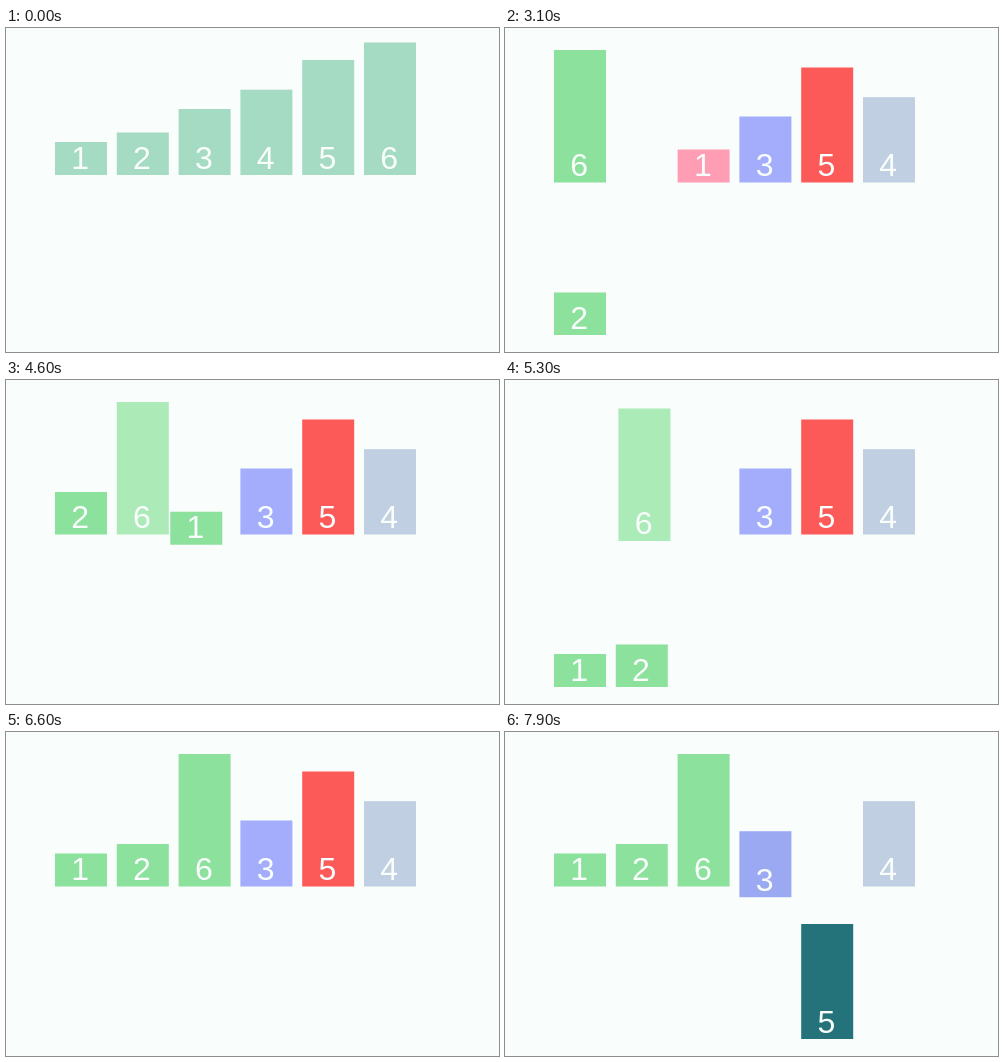
These frames come from a looping animation (493x324 px, 8 s). An HTML page with a canvas:

```html
<!DOCTYPE html>
<html lang="en">
<head>
<meta charset="utf-8">
<title>Merge sort</title>
<style>
  html, body { margin: 0; width: 100%; height: 100%; overflow: hidden; background: #f9fdfc; }
  canvas { display: block; width: 493px; height: 324px; }
</style>
</head>
<body>
<canvas id="stage"></canvas>
<script>
const W = 493, H = 324, LOOP = 8000, MOVE = 250;
const SHUFFLE = 1400, TINT = 2102;
const LEFT = 49, STEP = 61.8, BAR = 52, DROP = 152.5;
const PAPER = '#f9fdfc';
const MINT = [164, 219, 194], GREEN = [140, 225, 156], PALE = [172, 235, 184];
const BLUE = [163, 173, 251], TEAL = [36, 115, 122];

const heights = [33, 42.5, 66, 85.3, 115, 132.5];
const order = [6, 2, 1, 3, 5, 4];
const tints = {
  6: GREEN, 2: [249, 187, 120], 1: [255, 157, 181],
  3: BLUE, 5: [251, 90, 88], 4: [192, 207, 226]
};

// Each step changes one bar: start time, value, and new properties.
const steps = order.map(v => [TINT, v, { color: tints[v] }]);
const paint = (at, colors) => {
  for (const v in colors) steps.push([at, +v, { color: colors[v] }]);
};
const down = (at, v, col, color) =>
  steps.push([at, v, color ? { col, row: 1, color } : { col, row: 1 }]);
const up = (at, v, color) => steps.push([at, v, { row: 0, color }]);

paint(2455, { 6: GREEN, 2: GREEN });
down(2781, 2, 0);
down(3128, 6, 1);
up(3478, 2, GREEN);
up(3831, 6, GREEN);

paint(4165, { 1: GREEN, 2: GREEN, 6: PALE });
down(4537, 1, 0);
down(4890, 2, 1);
down(5246, 6, 2, GREEN);
up(5593, 1, GREEN);
up(5920, 2, GREEN);
up(6270, 6, GREEN);

paint(6655, { 3: TEAL, 5: TEAL });
down(7014, 3, 3);
down(7365, 5, 4);
up(7716, 3, BLUE);

const ease = p => p < 0.5 ? 4 * p ** 3 : 1 - 4 * (1 - p) ** 3;
const mix = (a, b, p) => Array.isArray(a)
  ? a.map((n, i) => mix(n, b[i], p))
  : a + (b - a) * p;

const canvas = document.getElementById('stage');
const ctx = canvas.getContext('2d');
const ratio = window.devicePixelRatio || 1;
canvas.width = W * ratio;
canvas.height = H * ratio;
ctx.scale(ratio, ratio);
ctx.font = '32px "Liberation Sans", Arial, sans-serif';
ctx.textAlign = 'center';

function barAt(value, index, t) {
  const bar = { col: index, row: 0, color: MINT };
  for (const [at, v, to] of steps) {
    if (v !== value || t <= at) continue;
    const p = ease(Math.min(1, (t - at) / MOVE));
    for (const key in to) bar[key] = mix(bar[key], to[key], p);
  }
  return bar;
}

function drawBar(value, { col, row, color }, base) {
  const x = LEFT + col * STEP;
  const bottom = base + row * DROP;
  const h = heights[value - 1];
  ctx.fillStyle = `rgb(${color.map(Math.round)})`;
  ctx.fillRect(x, bottom - h, BAR, h);
  ctx.fillStyle = PAPER;
  ctx.fillText(value, x + BAR / 2 - 0.8, bottom - 6.5);
}

function draw(t) {
  ctx.fillStyle = PAPER;
  ctx.fillRect(0, 0, W, H);
  const mixed = t >= SHUFFLE;
  const list = mixed ? order : [1, 2, 3, 4, 5, 6];
  list.forEach((v, i) => drawBar(v, barAt(v, i, t), mixed ? 154.5 : 147));
}

function tick() {
  draw(performance.now() % LOOP);
  requestAnimationFrame(tick);
}
tick();
</script>
</body>
</html>
```
